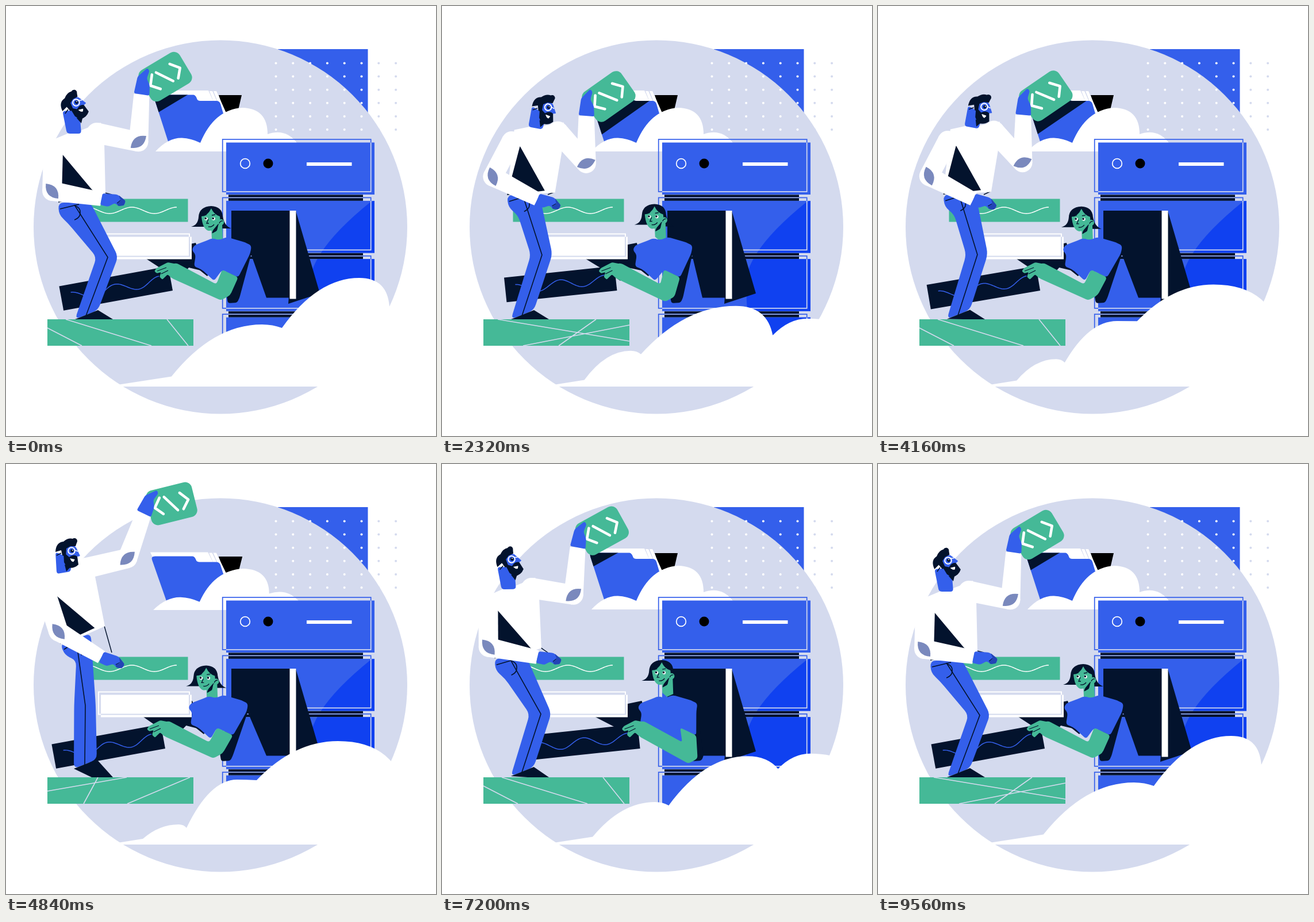
These frames come from a looping animation (748 px wide and 748 px high, 9600 ms). An HTML page with a canvas:

```html
<!DOCTYPE html>
<html lang="en">
<head>
<meta charset="utf-8">
<title>Server maintenance</title>
<style>
html, body { margin: 0; width: 100%; height: 100%; overflow: hidden; background: #fff; }
canvas { display: block; width: 748px; height: 748px; }
</style>
</head>
<body>
<canvas id="stage" width="748" height="748"></canvas>
<script>
const ctx = document.getElementById('stage').getContext('2d');
const LOOP = 9600, TAU = 2 * Math.PI, DEG = Math.PI / 180;
const SKY = '#d4daee', BLUE = '#345feb', BRIGHT = '#1041f0', NAVY = '#03132d';
const GREEN = '#45b997', PATCH = '#7a89bd', WHITE = '#fff', FINGER = '#2344b5';

// ---------- drawing helpers ----------
function poly(p, color, r = 0) {
  const n = p.length / 2;
  const at = i => [p[2 * ((i + n) % n)], p[2 * ((i + n) % n) + 1]];
  const toward = ([x, y], [u, v]) => {
    const f = Math.min(.5, r / (Math.hypot(u - x, v - y) || 1));
    return [x + (u - x) * f, y + (v - y) * f];
  };
  ctx.beginPath();
  for (let i = 0; i < n; i++) {
    const c = at(i);
    ctx.lineTo(...toward(c, at(i - 1)));
    if (r) ctx.quadraticCurveTo(...c, ...toward(c, at(i + 1)));
  }
  ctx.fillStyle = color; ctx.fill();
}
function box(x, y, w, h, color) { ctx.fillStyle = color; ctx.fillRect(x, y, w, h); }
function disc(x, y, r, color) {
  ctx.beginPath(); ctx.arc(x, y, r, 0, TAU); ctx.fillStyle = color; ctx.fill();
}
function ring(x, y, r, color, width) {
  ctx.beginPath(); ctx.arc(x, y, r, 0, TAU); ctx.strokeStyle = color; ctx.lineWidth = width; ctx.stroke();
}
function line(p, color, width) {
  ctx.beginPath();
  for (let i = 0; i < p.length; i += 2) ctx.lineTo(p[i], p[i + 1]);
  ctx.strokeStyle = color; ctx.lineWidth = width; ctx.stroke();
}
function shape(d, color) { ctx.fillStyle = color; ctx.fill(new Path2D(d)); }
function curve(d, color, width) { ctx.strokeStyle = color; ctx.lineWidth = width; ctx.stroke(new Path2D(d)); }
function group(x, y, degrees, draw) {
  ctx.save(); ctx.translate(x, y); ctx.rotate(degrees * DEG); draw(); ctx.restore();
}
// Local points placed in the frame [x, y, degrees]
function place([x, y, degrees], ...p) {
  const c = Math.cos(degrees * DEG), s = Math.sin(degrees * DEG);
  return p.map((v, i) => i % 2 ? y + p[i - 1] * s + v * c : x + v * c - p[i + 1] * s);
}
function limb([x, y], [u, v], r, q, color) {
  const len = Math.hypot(u - x, v - y), nx = (y - v) / len, ny = (u - x) / len;
  poly([x + nx * r, y + ny * r, u + nx * q, v + ny * q, u - nx * q, v - ny * q, x - nx * r, y - ny * r], color);
  disc(x, y, r, color);
}
// Elbow of a two-bone arm from a to b; side picks the bend
function bend([x, y], [u, v], upper, lower, side) {
  const d = Math.min(Math.hypot(u - x, v - y), upper + lower);
  const along = (d * d + upper * upper - lower * lower) / (2 * d);
  const out = side * Math.sqrt(Math.max(0, upper * upper - along * along));
  const cx = (u - x) / d, cy = (v - y) / d;
  return [x + cx * along - cy * out, y + cy * along + cx * out];
}
function wave(amp, color) {
  const p = [];
  for (let x = 18; x <= 174; x += 2) p.push(x, 20 - amp * Math.cos((x - 96) / 78 * TAU));
  line(p, color, 1.5);
}

// ---------- timing ----------
const TIMES = [0, 1440, 3320, 4840, 6280, 8240];
const count = TIMES.length;
const timeAt = i => TIMES[(i + count) % count] + LOOP * Math.floor(i / count);

// Smooth periodic curve through one value per entry of TIMES
function drift(t, ...values) {
  const v = i => values[(i + count) % count];
  const slope = i => {
    const a = v(i) - v(i - 1), b = v(i + 1) - v(i);
    return a * b <= 0 ? 0 : (a + b) / (timeAt(i + 1) - timeAt(i - 1));
  };
  let i = count - 1;
  while (TIMES[i] > t) i--;
  const span = timeAt(i + 1) - timeAt(i), s = (t - timeAt(i)) / span;
  return v(i) * (1 + 2 * s) * (1 - s) ** 2 + slope(i) * span * s * (1 - s) ** 2
    + v(i + 1) * s * s * (3 - 2 * s) + slope(i + 1) * span * s * s * (s - 1);
}

// ---------- man ----------
// Key joints; frames carry a third value, the tilt in degrees
const POSES = [
  { neck: [119, 222], hip: [119, 342, 0], knee: [176, 437], foot: [140, 537], head: [122, 168, -28], card: [277, 123, -31] },
  { neck: [62, 233], hip: [92, 349, -25], knee: [170, 435], foot: [140, 537], head: [62, 185, -26], card: [190, 79, -45] },
  { neck: [165, 212], hip: [142, 327, -3], knee: [173, 433], foot: [140, 537], head: [187, 176, 8], card: [292, 159, -35] },
  { neck: [101, 189], hip: [121, 304, -19], knee: [137, 420], foot: [138, 522], head: [114, 151, 0], card: [288, 69, -14] }
];
const STARTS = [120, 1640, 4000, 6640], MOVE = 820;

function manAt(t) {
  const i = STARTS.findLastIndex(start => t >= start);
  if (i < 0) return POSES[0];
  const s = Math.min(1, (t - STARTS[i]) / MOVE);
  const e = s < .5 ? 4 * s ** 3 : 1 - 4 * (1 - s) ** 3;
  const a = POSES[i], b = POSES[(i + 1) % 4], man = {};
  for (const key in a) man[key] = a[key].map((v, k) => v + (b[key][k] - v) * e);
  return man;
}

function drawLegs({ hip, knee: [kx, ky], foot: [fx, fy] }) {
  const seam = place(hip, 0, 4);
  poly([...place(hip, -28, 0, -27, 21, -11, 36), kx - 18.5, ky, fx - 20, fy + 8,
    fx + 20, fy - 8, kx + 19, ky - 1, ...place(hip, 28, 0)], BLUE, 10);
  line([...seam, kx + 1, ky, fx - 1, fy + 2], NAVY, 1.6);
  group(...hip, () => curve('M-25,11 L8,3 M2,6 Q13,10 9,23 Q6,28 0,30', NAVY, 1.6));
  poly([fx - 20, fy + 8, fx + 20, fy - 8, 186, 545, 149, 545], NAVY);
}

function drawArm(shoulder, wrist, upper, lower, side, wide, cuff) {
  const elbow = bend(shoulder, wrist, upper, lower, side);
  limb(shoulder, elbow, wide, 17, WHITE);
  limb(elbow, wrist, 17, cuff, WHITE);
  const angle = p => Math.atan2(p[1] - elbow[1], p[0] - elbow[0]);
  const turn = (angle(shoulder) + angle(wrist)) / 2 / DEG;
  group(...elbow, turn, () => shape('M0,-17 Q17,0 0,17 Q-17,0 0,-17 Z', PATCH));
  return angle(wrist) / DEG;
}

function drawHead(head, chest) {
  const nape = place(head, -28, 2), jaw = place(head, -1, 14);
  poly([...nape, ...place(chest, -13, 0, 12, 0), ...jaw], BLUE, 5);
  group(...head, () => {
    poly([-12, 24, -1, 27, -9, 36], NAVY);
    poly([-10, -7, 4, -9, 8, -6, 15, 9, 6, 11, -2, 14, -12, 10], BLUE, 1);
    shape('M-28,2 Q-27,-15 -14,-16 Q-6,-23 2,-21 L9,-14 L7,-8 L-2,-8 L-9,-4 L-10,10 L-16,8 L-18,-1 Z', NAVY);
    disc(5, -17, 5, NAVY);
    shape('M-14,3 L-10,6 L-4,11 Q4,5 10,10 L12,24 Q4,32 -8,29 L-13,20 Z', NAVY);
    poly([-3, 13, 6, 15, 3, 19.5, 0, 18], WHITE, 1);
    line([-26, 8, -18, 4], NAVY, 1.5);
    line([6, -1, 11, 1], WHITE, 1.5);
    ring(0, 0, 5.8, WHITE, 2);
    disc(1, 0, 2.8, NAVY);
    disc(1.8, -1, .9, WHITE);
  });
}

function drawCard(card) {
  group(...card, () => {
    ctx.beginPath(); ctx.roundRect(-41, -31, 82, 62, 12);
    ctx.fillStyle = GREEN; ctx.fill();
    ctx.lineCap = ctx.lineJoin = 'round';
    line([-10, -14.5, 8, 13.5], WHITE, 4.6);
    for (const s of [-1, 1]) line([18 * s, -15, 30 * s, 0, 18 * s, 14], WHITE, 4.6);
    poly([-61.5, -3.5, -41, -25, -19, -29, -18, -23, -29, -14, -31, -1, -40.5, 14], BLUE, 3);
  });
}

function drawMan(man) {
  const { neck, hip, head, card } = man;
  const chest = [...neck, Math.atan2(neck[0] - hip[0], hip[1] - neck[1]) / DEG];
  const waistLeft = place(hip, -28, 0), fist = [166, 336];
  drawLegs(man);
  line([...place(chest, 53, 103), 184, 328], NAVY, 1.5);
  poly([...place(chest, -12, 0, -36, 10), ...waistLeft,
    ...place(chest, 18, 113, 54, 104, 52, 16, 46, -19, 12, -6)], WHITE);
  poly([...place(chest, -21, 36, 36, 104), ...waistLeft], NAVY);
  drawArm(place(chest, 39, -1), place(card, -51, 5), 74, 83, 1, 18, 13.5);
  const reach = drawArm(place(chest, -37, 30), fist, 70, 87, 1, 17, 12);
  group(...fist, (reach - 9) * .6, () => {
    poly([2, -10, 28, -8, 42, 3, 40, 10, 30, 12, 23, 7, 12, 13, -2, 10], BLUE, 3);
    poly([30, -7, 42, 3, 39, 11, 29, 12, 27, 7, 34, 3], FINGER, 2);
    line([27, 7, 33, 2], NAVY, 1);
  });
  drawHead(head, chest);
  drawCard(card);
}

// ---------- surroundings ----------
function drawBackdrop() {
  box(0, 0, 748, 748, WHITE);
  box(473, 75, 156.5, 130, BLUE);
  disc(373, 384.5, 325, SKY);
  for (let i = 0; i < 8; i++)
    for (let j = 0; j < 6; j++)
      disc(469.5 + 29.8 * i, 99.5 + 23.1 * j, 2, i < 6 ? WHITE : SKY);
}

function drawFolder(t, card) {
  const s = Math.min(1, Math.abs(t - 4840) / 600);
  const squash = Math.cos(s * Math.PI / 2) ** 2;
  ctx.save();
  ctx.translate(375, 253 + squash);
  ctx.scale(1 + .034 * squash, 1 - .052 * squash);
  ctx.translate(-375, -253);
  poly([370, 155, 410, 155, 403, 185, 381, 188], '#000');
  poly([255, 147, 352, 147, 372, 190, 275, 190], WHITE);
  for (const x of [354, 361]) poly([x, 148, x + 5, 148, x + 22, 186, x + 15, 186], WHITE);
  const front = new Path2D('M258,161 Q256,154.500 263,154.500 L326,154.500 Q330,155 332,161 Q333,165 338,165 L366,165 Q371,165 373,170 L395,245 L285,245 Z');
  ctx.fillStyle = BLUE; ctx.fill(front);
  ctx.save();
  ctx.clip(front);
  group(...card, () => box(-50, -30, 110, 77, NAVY));
  ctx.restore();
  shape('M260,253 Q282,229 306,229.500 Q322,230 338,238 Q362,180 411,177 Q455,178 455,223 Q486,212 506,238 L512,253 Z', WHITE);
  ctx.restore();
}

function drawServer(shoulder) {
  for (let i = 0; i < 4; i++) {
    const y = 237.5 + i * 101.4;
    if (i) box(387, y - 10.5, 234, 10.5, NAVY);
    ctx.strokeStyle = BLUE; ctx.lineWidth = 1.7;
    ctx.strokeRect(376.7, y - 5.5, 258, 91);
    box(383, y, 258, 90.5, BLUE);
    ctx.save();
    ctx.beginPath(); ctx.rect(383, y, 258, 90.5); ctx.clip();
    if (i) shape('M634,341 Q546,412 531,465 Q522,570 570,650 L641,650 L641,339 Z', BRIGHT);
    ctx.strokeStyle = SKY;
    ctx.strokeRect(376.7, y - 5.5, 258, 91);
    ctx.restore();
    if (i) line([387, y - 5.5, 621, y - 5.5], SKY, 1);
  }
  ring(416, 274, 8.3, WHITE, 1.7);
  disc(456, 274, 8.5, '#000');
  box(523, 272, 78.5, 6, WHITE);
  poly([392, 356, 494, 356, 494, 507.5, 453, 507.5, shoulder, 428, 392, 428], NAVY);
  poly([504, 356, 546, 500, 491, 518], NAVY);
  box(493.5, 356, 11, 153.5, WHITE);
}

// Three puffs; two drifting notches and one crown height shape them all
function drawCloud(t) {
  const ax = drift(t, 480, 360, 345, 314, 398, 390), ay = drift(t, 560, 608, 603, 633, 583, 607);
  const bx = drift(t, 667, 641, 495, 436, 595, 572), by = drift(t, 523, 595, 546, 550, 518, 545);
  const crown = drift(t, 473, 502, 541, 549, 501, 517);
  const tail = 238 + (ax - 314) * .3, last = (680 - bx) * .58;
  let x = tail, y = 652 - (tail - 238) * .15;
  const puff = (topX, topY, endX, endY) => {
    const round = Math.min(1, .45 + (endY - topY) / (endX - topX) * .5);
    ctx.quadraticCurveTo(x + (topX - x) * .46, topY, topX, topY);
    ctx.quadraticCurveTo(topX + (endX - topX) * round, topY, endX, endY);
    x = endX; y = endY;
  };
  ctx.beginPath();
  ctx.moveTo(150, 662); ctx.lineTo(197, 658.5); ctx.lineTo(x, y);
  puff(ax - (ax - tail) * .18, ay - 6, ax, ay);
  puff(ax + (bx - ax) * .72, crown, bx, by);
  puff(bx + last, by - last * .48, bx + last + 120, by - last * .48 + 100);
  ctx.lineTo(748, 662);
  ctx.fillStyle = WHITE; ctx.fill();
}

const CRACKS = [
  'M104,545 L253,591 M72,560 L132,591 M280,545 L317,591',
  'M72,569 L210,545 M160,545 L135,591 M211,591 L320,545',
  'M97,545 L326,583 M141,591 L326,555 M203,591 L268,545'
];
function drawSlab(t) {
  box(72, 545, 254, 46, GREEN);
  curve(CRACKS[Math.floor(t / (LOOP / 9)) % 3], SKY, 1.6);
}

function drawBars(t, reach) {
  const tilt = -8.2 - 2.2 * Math.cos(t / 4800 * TAU);
  group(290 + reach, 495, tilt, () => {
    box(-193, -43, 193, 43, NAVY);
    ctx.translate(-193, -41);
    wave(8, BLUE);
  });
  box(123.5, 335.5, 193, 40, GREEN);
  group(123, 335.5, 0, () => wave(5.5, WHITE));
  ctx.strokeStyle = WHITE; ctx.lineWidth = 2;
  ctx.strokeRect(161, 396.5, 158, 39);
  box(165, 401.5, 158, 39, WHITE);
  ctx.save();
  ctx.beginPath(); ctx.rect(165, 401.5, 158, 39); ctx.clip();
  ctx.strokeStyle = SKY;
  ctx.strokeRect(161, 396.5, 158, 39);
  ctx.restore();
}

// ---------- woman ----------
function drawLeg(lean, reach) {
  const k = reach * .35;
  poly([232 + k, 432, 330 + lean, 412, 347 + lean, 462, 318 + k, 455, 300 + reach * .7, 478, 284 + reach * .6, 466], NAVY);
}

function drawFace() {
  shape('M-35,9 Q-23,6 -22,-8 Q-21,-26 0,-27 Q19,-26 20,-9 Q23,8 35,12 L14,12 L-10,9 Z', NAVY);
  poly([0, 8, 19, 4, 20, 32, 9, 37, 1, 30], GREEN);
  shape('M-17,-9 Q-6,-10 0,-23 Q5,-12 15,-9 Q17,0 11,8 Q4,17 -5,16 Q-15,13 -17,-9 Z', GREEN);
  poly([13, 3, 10, 16, 1, 21, 3, 15], NAVY, 2);
  disc(17, 1, 5.2, GREEN);
  for (const x of [-9, 4]) {
    disc(x, -5, 2.8, WHITE);
    disc(x - .8, -5.5, 1.8, NAVY);
  }
  curve('M14,3 Q16,-2 20,-1 M-14,-10 L-8,-12 M1,-11 L7,-12 M-5,-4 L-8,3 L-4,3 M-5,9 Q1,10 5,5', NAVY, 1.3);
}

function drawWoman(lean, reach) {
  const cuff = reach * .7, elbow = 505 + Math.max(0, reach) * .17, back = reach * .9;
  poly([425 + lean, 420, 427 + lean, 430, 406 + back, 508, 402 + back, 516, 386 + back, 517, 380 + back, 480], NAVY, 4);
  poly([335 + lean, 458, 360 + lean, 458, 350 + lean, 470], NAVY);
  group(357 + 1.45 * lean, 375 - .4 * lean, 0, drawFace);
  group(lean, 0, 0, () => {
    const sleeve = cuff - lean;
    poly([352, 407, 358, 404, 371, 407, 384, 402, 416, 411, 427, 417, 425, 430, 404 + sleeve, 472,
      376 + sleeve, 459, 362, 478, 340, 458, 327, 453, 330, 433, 323, 424, 328, 416], BLUE, 5);
  });
  poly([376 + cuff, 458.5, 404 + cuff, 472, 390 + reach, elbow - 2, 374 + reach, elbow + 7,
    287 + reach, 473, 285 + reach, 450, 296 + reach, 447, 366 + reach * .95, 484], GREEN, 5);
  group(reach, 0, 0, () => {
    poly([298, 449, 281, 446, 262, 456, 258, 461, 262, 465, 270, 463, 267, 471, 272, 476, 281, 467, 289, 474], GREEN, 2);
    curve('M263,461 L279,455 M270,466 L282,460', NAVY, 1.2);
  });
}

function render(now) {
  const t = now % LOOP, man = manAt(t);
  const lean = drift(t, 0, 10, 5, -6, 18, 14);
  const reach = drift(t, 0, 20, 3, -13, 60, 39);
  drawBackdrop();
  drawFolder(t, man.card);
  drawServer(425 + lean);
  drawLeg(lean, reach);
  drawSlab(t);
  drawBars(t, reach);
  drawWoman(lean, reach);
  drawCloud(t);
  drawMan(man);
}

let begin;
function tick(now) {
  begin ??= now;
  render(now - begin);
  requestAnimationFrame(tick);
}
render(0);
requestAnimationFrame(tick);
</script>
</body>
</html>
```
